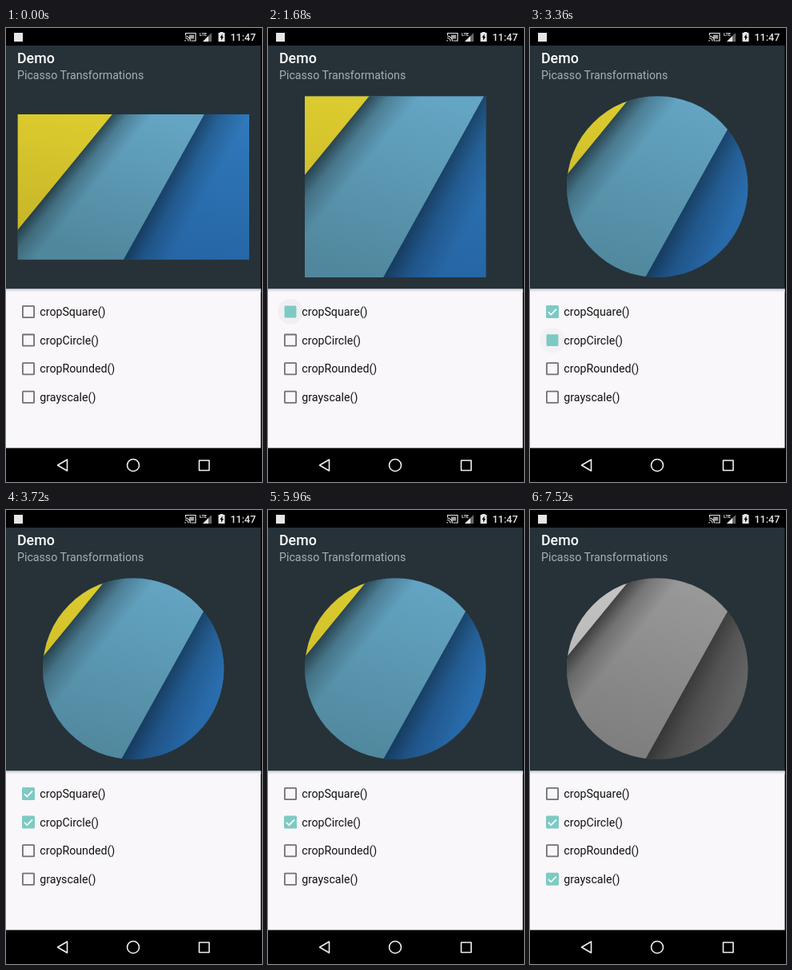
An HTML page that plays this animation: 320x568 px, repeating every 8000 ms.

```html
<!DOCTYPE html>
<html lang="en">
<head>
<meta charset="utf-8">
<title>Demo</title>
<style>
  html, body { margin: 0; width: 100%; height: 100%; overflow: hidden; background: #000; }
  svg { display: block; width: 100%; height: 100%; font-family: Roboto, sans-serif; }
</style>
</head>
<body>
<svg viewBox="0 0 320 568">
  <defs>
    <linearGradient id="blue" gradientUnits="userSpaceOnUse" x1="270" y1="108" x2="240" y2="290">
      <stop stop-color="#2f79bb"/><stop offset="1" stop-color="#2666a5"/>
    </linearGradient>
    <linearGradient id="sky" gradientUnits="userSpaceOnUse" x1="180" y1="108" x2="130" y2="290">
      <stop stop-color="#64a5c3"/><stop offset="1" stop-color="#50879d"/>
    </linearGradient>
    <linearGradient id="yellow" gradientUnits="userSpaceOnUse" x1="50" y1="108" x2="30" y2="240">
      <stop stop-color="#dccb2e"/><stop offset="1" stop-color="#c9b728"/>
    </linearGradient>
    <linearGradient id="shadeA" gradientUnits="userSpaceOnUse" x1="73.5" y1="180.5" x2="104" y2="205.5">
      <stop stop-opacity=".56"/><stop offset=".4" stop-opacity=".22"/><stop offset="1" stop-opacity="0"/>
    </linearGradient>
    <linearGradient id="shadeB" gradientUnits="userSpaceOnUse" x1="197.5" y1="199" x2="241" y2="223">
      <stop stop-opacity=".42"/><stop offset=".4" stop-opacity=".18"/><stop offset="1" stop-opacity="0"/>
    </linearGradient>
    <linearGradient id="drop" x2="0" y2="1">
      <stop stop-color="#cbd3da"/><stop offset="1" stop-color="#f9f7fa"/>
    </linearGradient>
    <clipPath id="crop"><rect id="frame"/></clipPath>
  </defs>

  <rect width="320" height="568"/>
  <rect y="22" width="318.5" height="305" fill="#263238"/>
  <rect y="326.5" width="318.5" height="199" fill="#f9f7fa"/>
  <rect y="326.5" width="318.5" height="4" fill="url(#drop)"/>

  <!-- status bar -->
  <g fill="#e6e6e6">
    <rect x="10" y="6" width="11" height="11"/>
    <path d="M224.500 9V6.500H237V16H231.500M224 16.500v-1.500M224 12.500a4 4 0 0 1 4 4M224 10a6.500 6.500 0 0 1 6.500 6.500" fill="none" stroke="#e6e6e6" stroke-width="1.200"/>
    <rect x="229" y="8.500" width="6" height="5" opacity=".7"/>
    <path d="M246 17L257 6V17Z" opacity=".45"/>
    <path d="M246 17L253 10V17Z"/>
    <text x="242" y="10" font-size="5.500" font-weight="700">LTE</text>
    <path d="M267.500 6V5H271.500V6H273.500V17H265.500V6Z"/>
    <path d="M270.500 7.500L267.500 12H269V15.500L272 11H270.500Z" fill="#000"/>
    <text x="280.500" y="15.500" font-size="12.500" font-weight="500">11:47</text>
  </g>

  <text x="14" y="44" font-size="17.800" font-weight="500" fill="#fff">Demo</text>
  <text x="14" y="64" font-size="14.200" fill="#a8afb2">Picasso Transformations</text>

  <g id="photo"><g clip-path="url(#crop)"><g id="art">
    <rect x="14.500" y="108" width="289.500" height="182" fill="url(#blue)"/>
    <rect x="14.500" y="108" width="289.500" height="182" fill="url(#shadeB)"/>
    <path d="M14.500 108H248L147 290H14.500Z" fill="url(#sky)"/>
    <path d="M14.500 108H248L147 290H14.500Z" fill="url(#shadeA)"/>
    <path d="M14.500 108H133L14.500 253Z" fill="url(#yellow)"/>
  </g></g></g>

  <g id="list"></g>
  <g id="touch"><circle r="10" fill="#fff" fill-opacity=".45" stroke="#a9a9ad" stroke-opacity=".6" stroke-width="1.200"/></g>

  <!-- navigation bar -->
  <g fill="none" stroke="#f0f0f0" stroke-width="1.600" stroke-linejoin="round">
    <path d="M64.500 547L76.500 540V554Z"/>
    <circle cx="159" cy="547" r="7.500"/>
    <rect x="241.500" y="541" width="12.500" height="12.500"/>
  </g>
</svg>
<script>
const LOOP = 8000, TEAL = '#7dcac4', GREY = '#717174';
const $ = id => document.getElementById(id);
const clamp = x => Math.max(0, Math.min(1, x));
const span = (x, a, b) => clamp((x - a) / (b - a));
const ease = x => x * x * (3 - 2 * x);

const taps = [
  { row: 0, down: 1040, y: 354, start: 1200, end: 2120, on: true },
  { row: 1, down: 2720, y: 386, start: 2800, end: 3720, on: true },
  { row: 0, down: 5120, y: 353, start: 5200, end: 5960, on: false },
  { row: 3, down: 6520, y: 461, start: 6600, end: 7520, on: true },
];

// The photo vanishes at `clear`, then fades in from `load`.
const wide = { x: 14.5, y: 108, width: 289.5, height: 182, rx: 0 };
const square = { x: 46, y: 85.2, width: 226.5, height: 226.8, rx: 0 };
const circle = { ...square, rx: 113.3 };
const photos = [
  { clear: -1000, load: -1000, shape: wide, zoom: 1 },
  { clear: 1240, load: 1480, shape: square, zoom: 1.247 },
  { clear: 2840, load: 3080, shape: circle, zoom: 1.247 },
  { clear: 6640, load: 6880, shape: circle, zoom: 1.247, grey: true },
];

const rows = ['cropSquare()', 'cropCircle()', 'cropRounded()', 'grayscale()'].map((label, i) => {
  const y = 355 + i * 35.6;
  $('list').insertAdjacentHTML('beforeend', `
    <g transform="translate(28 ${y})">
      <circle class="ripple"/>
      <path class="box" fill-rule="evenodd"/>
      <path class="tick" d="M-5 .3L-1.700 3.600L5 -3.300" fill="none" stroke="#fff" stroke-width="1.700"/>
    </g>
    <text x="42.300" y="${y + 5}" font-size="14.200" fill="#111">${label}</text>`);
  const g = $('list').querySelectorAll('g')[i];
  return { ripple: g.children[0], box: g.children[1], tick: g.children[2] };
});

function set(el, attrs) {
  for (const k in attrs) el.setAttribute(k, attrs[k]);
}

function drawRow({ ripple, box, tick }, tap, t) {
  const p = tap ? span(t, tap.start, tap.end) : 0;
  const q = tap && !tap.on ? 1 - p : p;
  const hole = 6.2 * (1 - ease(span(q, .15, .48)));
  const active = q > (tap && !tap.on ? .3 : 0);
  set(box, {
    d: 'M-6.500-8h13q1.500 0 1.500 1.500v13q0 1.500-1.500 1.500h-13q-1.500 0-1.500-1.500v-13q0-1.500 1.500-1.500z' +
       `M${-hole} ${-hole}H${hole}V${hole}H${-hole}z`,
    fill: active ? TEAL : GREY,
    transform: `scale(${1 - .07 * Math.sin(Math.PI * p)})`,
  });
  set(tick, { transform: `scale(${ease(span(q, .58, 1))})`, opacity: q > .58 ? 1 : 0 });
  const glow = tap && tap.on ? span(p, .1, .25) * (1 - span(p, .5, .84)) : 0;
  set(ripple, { r: 4 + 12 * ease(span(p, .1, .4)), opacity: .035 * glow });
}

function draw(t) {
  rows.forEach((row, i) => drawRow(row, taps.filter(k => k.row === i && k.down <= t).pop(), t));

  const tap = taps.filter(k => k.down <= t).pop();
  set($('touch'), {
    transform: `translate(88 ${tap ? tap.y : 0})`,
    opacity: tap ? 1 - span(t - tap.down, 140, 170) : 0,
  });

  const photo = photos.filter(p => p.clear <= t).pop();
  set($('frame'), photo.shape);
  set($('art'), { transform: `translate(159.200 198.800) scale(${photo.zoom}) translate(-159.200 -199)` });
  set($('photo'), {
    opacity: span(t, photo.load, photo.load + 200),
    style: photo.grey ? 'filter:grayscale(1)' : '',
  });
}

const begin = performance.now();
function tick() {
  draw((performance.now() - begin) % LOOP);
  requestAnimationFrame(tick);
}
tick();
</script>
</body>
</html>
```
